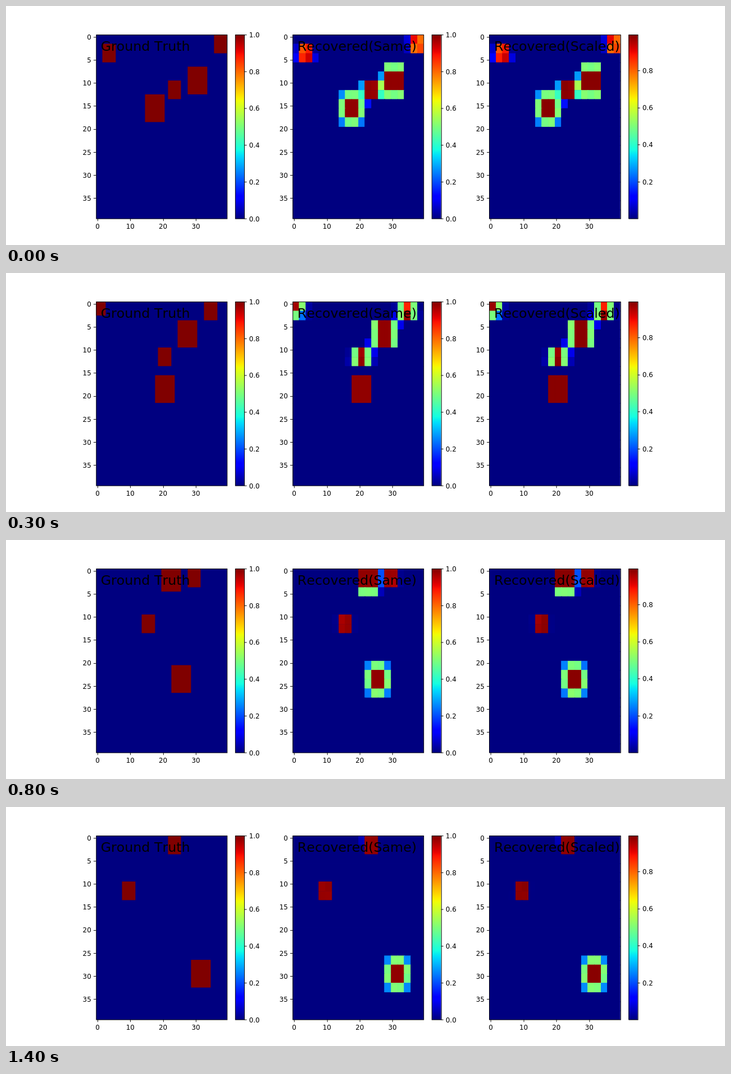
These frames come from a looping animation (1280 by 427 pixels, 1.5 s). An HTML page:

```html
<!DOCTYPE html>
<html lang="en">
<head>
<meta charset="utf-8">
<title>Recovery heat maps</title>
<style>
  html, body { margin: 0; width: 100%; height: 100%; overflow: hidden; background: #fff; }
  svg { display: block; width: 1280px; height: 427px; }
  text { font-family: "DejaVu Sans", sans-serif; font-size: 11.85px; font-kerning: none; fill: #000; }
  .title { font-size: 23.7px; }
  .line { stroke: #000; stroke-width: .95; fill: none; }
</style>
</head>
<body>
<svg id="stage" viewBox="0 0 1280 427"></svg>
<script>
const STEP = 100, STEPS = 15, SIZE = 40, COLS = SIZE / 2;
const LEFT = 160, TOP = 51.24, W = 233.4, H = 328.8, STRIDE = 350.1;
const PX = W / SIZE, PY = H / SIZE, END = TOP + H;
const UNIT = 1280 / 1500; // plot pixel on the stage
const stage = document.getElementById('stage');

const edge = v => Math.round(v / UNIT) * UNIT;
const mid = v => edge(v) + UNIT / 2;

function add(parent, tag, attrs, text) {
  const el = document.createElementNS('http://www.w3.org/2000/svg', tag);
  set(el, attrs);
  if (text !== undefined) el.textContent = text;
  parent.appendChild(el);
  return el;
}
function set(el, attrs) {
  for (const k in attrs) el.setAttribute(k, attrs[k]);
}
const line = (x1, y1, x2, y2) => add(stage, 'line', { x1, y1, x2, y2, class: 'line' });
const label = (x, y, s, anchor) => add(stage, 'text', { x, y, 'text-anchor': anchor }, s);
function outline(x, w) {
  const l = mid(x), t = mid(TOP);
  add(stage, 'rect', { x: l, y: t, width: mid(x + w) - l, height: mid(END) - t, class: 'line' });
}

// Jet colour map
const clamp = v => Math.min(1, Math.max(0, v));
const ramp = (v, a, b) => clamp((v - a) / (b - a));
function jet(v) {
  const r = ramp(v, .35, .66) - .5 * ramp(v, .89, 1);
  const g = ramp(v, .125, .375) - ramp(v, .64, .91);
  const b = .5 + .5 * ramp(v, 0, .11) - ramp(v, .34, .65);
  return `rgb(${[r, g, b].map(c => Math.round(c * 255))})`;
}

// Moving squares: start column, start row, size, step per tick
const squares = [
  { x: 15, y: 13, n: 6, dx: 1, dy: 1 },
  { x: 28, y: 7, n: 6, dx: -1, dy: -1 },
  { x: 22, y: 10, n: 4, dx: -1, dy: 0 },
  { x: 36, y: 0, n: 4, dx: -1, dy: 0 },
  { x: 2, y: 2, n: 4, dx: -1, dy: -1 }
];
const place = (s, i) => ({ x: s.x + s.dx * i, y: s.y + s.dy * i, n: s.n });

const random = n => { const s = Math.sin((n + 1) * 12.9898) * 43758.5453; return s - Math.floor(s); };
const overlap = (cell, start, n) => Math.max(0, Math.min(cell + 2, start + n) - Math.max(cell, start));

// Coarse estimate: coverage of each 2 x 2 cell, smeared sideways between
// neighbouring squares; small squares start uncertain and settle with time
function recover(i) {
  const now = squares.map(s => place(s, i));
  const share = (s, c, r) => c < 0 || c >= COLS ? 0 :
    overlap(c * 2, s.x, s.n) * overlap(r * 2, s.y, s.n) / 4;
  const cover = (c, r) => now.reduce((sum, s) => sum + share(s, c, r), 0);
  const near = (s, c, r) => overlap(c * 2, s.x - 2, s.n + 4) && overlap(r * 2, s.y - 2, s.n + 4);
  const doubt = Math.exp(-i / 4), smear = .55 * Math.exp(-i / 8);

  return Array.from({ length: COLS * COLS }, (_, k) => {
    const c = k % COLS, r = Math.floor(k / COLS), rnd = random(k + i * 400);
    const close = now.filter(s => near(s, c, r));
    const small = close.some(s => s.n === 4);
    const own = cover(c, r);
    if (own === 1) return .985 - (small && close.every(s => s.n === 4) ? .25 * rnd * doubt : 0);
    const sides = (cover(c - 1, r) + cover(c + 1, r)) / 2;
    const bridge = close.length > 1 ? smear * sides : 0;
    const leak = small && !own && sides ? .12 * rnd * doubt : 0;
    return Math.max(own && own + (rnd - .5) * .03, bridge, leak);
  });
}
const grids = Array.from({ length: STEPS }, (_, i) => recover(i));

const defs = add(stage, 'defs', {});
const grad = add(defs, 'linearGradient', { id: 'jet', x1: 0, y1: 1, x2: 0, y2: 0 });
for (let v = 0; v <= 64; v++)
  add(grad, 'stop', { offset: v / 64, 'stop-color': jet(v / 64) });

function panel(p, title) {
  const left = LEFT + p * STRIDE, bar = left + 248, barW = H / 20;
  const box = { x: edge(left), y: edge(TOP), width: W, height: H };
  add(add(defs, 'clipPath', { id: 'plot' + p }), 'rect', box);
  const g = add(stage, 'g', { 'clip-path': `url(#plot${p})` });
  add(g, 'rect', { ...box, fill: jet(0) });

  // Cells reach under their right and lower neighbours to avoid seams
  const cells = p === 0
    ? squares.map(() => add(g, 'rect', { fill: jet(1) }))
    : grids[0].map((_, k) => add(g, 'rect', {
        x: edge(left + k % COLS * 2 * PX), y: edge(TOP + Math.floor(k / COLS) * 2 * PY),
        width: 2 * PX + 1, height: 2 * PY + 1
      }));

  outline(left, W);
  for (let v = 0; v < SIZE; v += 10) {
    const x = left + (v + .5) * PX;
    line(mid(x), END, mid(x), END + 4.15);
    label(x, 397.6, v, 'middle');
  }
  for (let v = 0; v < SIZE; v += 5) {
    const y = TOP + (v + .5) * PY;
    line(left - 4.15, mid(y), left + .5, mid(y));
    label(left - 8.3, y + 4.7, v, 'end');
  }
  add(stage, 'text', { x: left + 1.5 * PX, y: TOP + 3.5 * PY, class: 'title' }, title);

  add(stage, 'rect', { x: bar, y: TOP, width: barW, height: H, fill: 'url(#jet)' });
  outline(bar, barW);
  return { left, bar: bar + barW, cells };
}

function scale({ bar }, lo, hi) {
  for (let n = 0; n <= 5; n++) {
    const v = n / 5;
    if (v < lo || v > hi) continue;
    const y = END - H * (v - lo) / (hi - lo);
    line(bar, mid(y), bar + 4.15, mid(y));
    label(bar + 8.3, y + 4.7, v.toFixed(1), 'start');
  }
}

const LOW = .001, HIGH = .993;
const [truth, same, scaled] = ['Ground Truth', 'Recovered(Same)', 'Recovered(Scaled)']
  .map((t, p) => panel(p, t));
scale(truth, 0, 1);
scale(same, 0, 1);
scale(scaled, LOW, HIGH);

function draw(i) {
  squares.forEach((s, k) => {
    const { x, y, n } = place(s, i);
    const l = edge(truth.left + x * PX), t = edge(TOP + y * PY);
    set(truth.cells[k], {
      x: l, y: t,
      width: edge(truth.left + (x + n) * PX) - l, height: edge(TOP + (y + n) * PY) - t
    });
  });
  grids[i].forEach((v, k) => {
    set(same.cells[k], { fill: jet(v) });
    set(scaled.cells[k], { fill: jet((v - LOW) / (HIGH - LOW)) });
  });
}

const start = performance.now();
let shown = -1;
function tick() {
  const i = Math.floor((performance.now() - start) / STEP) % STEPS;
  if (i !== shown) draw(shown = i);
  requestAnimationFrame(tick);
}
tick();
</script>
</body>
</html>
```
